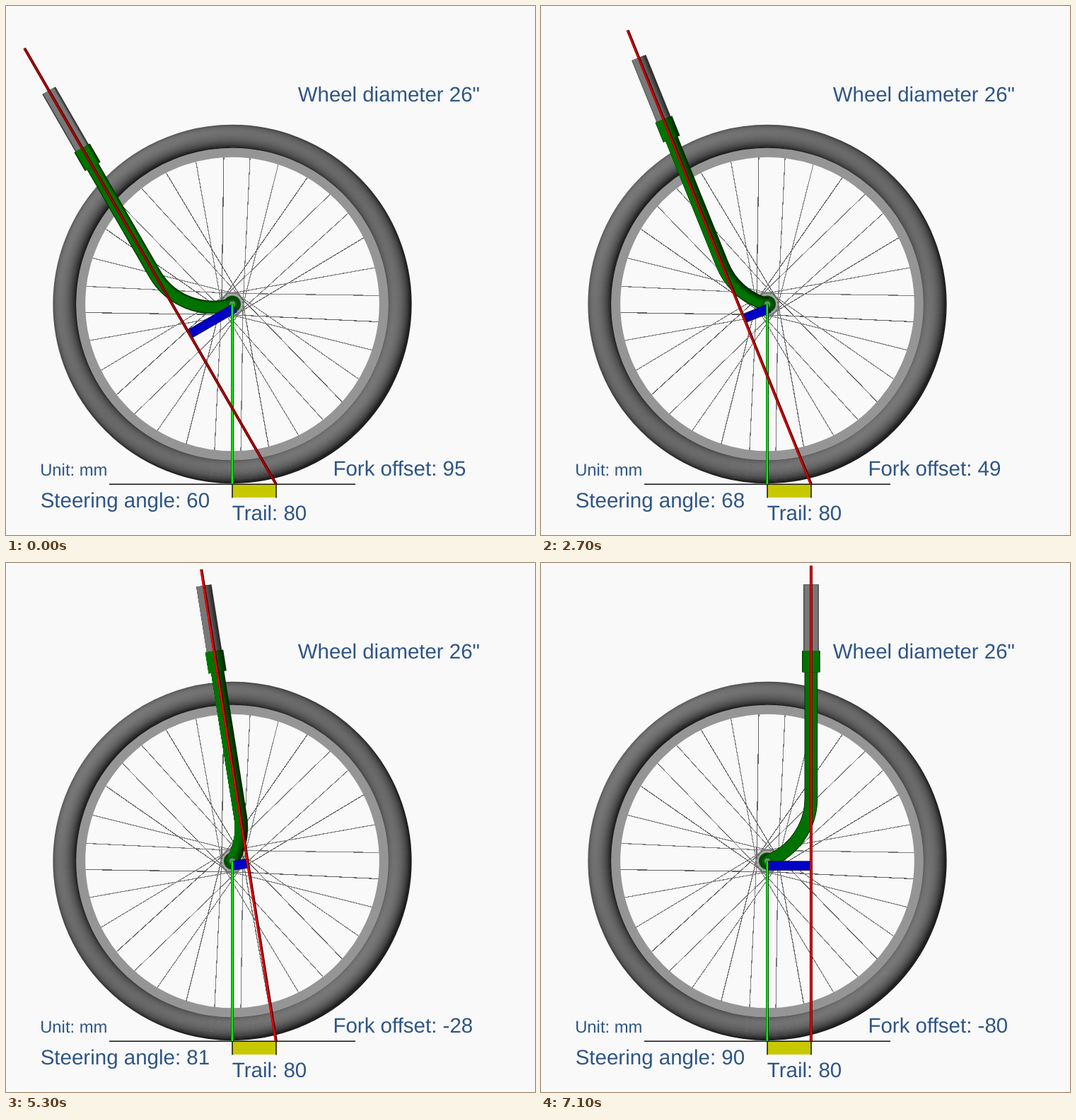
An HTML page that plays this animation: 748x748 px, repeating every 8 s.

```html
<!DOCTYPE html>
<html lang="en">
<head>
<meta charset="utf-8">
<title>Fork offset and trail</title>
<style>
html, body { margin: 0; width: 100%; height: 100%; overflow: hidden; background: #f9f9f9; }
svg { display: block; width: 100vw; height: 100vh; }
text { font: 29.5px "Liberation Sans", Arial, sans-serif; fill: #2e5586; text-rendering: geometricPrecision; }
.small { font-size: 23.8px; }
.crisp { shape-rendering: crispEdges; }
</style>
</head>
<body>
<svg id="stage" viewBox="0 0 748 748">
  <defs id="defs"></defs>
  <g id="wheel" fill="none"></g>
  <path d="M146 676.3H494" stroke="#111" stroke-width="1.5"/>
  <rect x="320" y="677" width="62" height="18" fill="#c8c800"/>
  <path d="M320 676V695.5M382 676V695.5" stroke="#111" stroke-width="1.5"/>
  <circle cx="320" cy="421.5" r="12" fill="#004c00"/>
  <g id="fork" fill="none">
    <g id="steerer"></g>
    <g id="blades"></g>
    <g id="collar"></g>
  </g>
  <circle cx="320" cy="421.5" r="7" fill="#006400"/>
  <circle cx="320" cy="421.5" r="4" fill="#6f8f6f"/>
  <g id="bar"><rect id="offsetBar" height="12.6" fill="#0000c4" stroke="#000050" stroke-width=".8"/></g>
  <path d="M320 421.5V676" stroke="#053c05" stroke-width="4"/>
  <path d="M319.8 421.5V676" stroke="#00f400" stroke-width="2.4"/>
  <g id="axis">
    <path id="axisDark" stroke="#480000" stroke-width="4"/>
    <path id="axisLight" stroke-width="2.6"/>
  </g>
  <text x="412.8" y="134.8" style="font-size:29.4px">Wheel diameter 26"</text>
  <text x="462.4" y="664.3">Fork offset: <tspan id="offset"></tspan></text>
  <text class="small" x="48.2" y="664">Unit: mm</text>
  <text x="48.7" y="708.6">Steering angle: <tspan id="angle"></tspan></text>
  <text x="319.8" y="727">Trail: 80</text>
</svg>
<script>
const $ = id => document.getElementById(id);
const CX = 320, CY = 421.5, SCALE = 0.775;
const RADIUS = 328, TRAIL = 80, BEND = 95, LAYERS = 6;

function add(parent, tag, attrs) {
  const el = document.createElementNS("http://www.w3.org/2000/svg", tag);
  set(el, attrs);
  parent.appendChild(el);
  return el;
}
function set(el, attrs) {
  for (const key in attrs) el.setAttribute(key, attrs[key]);
}
const mix = (a, b, t) => a + (b - a) * t;
const rgb = (a, b, t) => `rgb(${a.map((v, i) => Math.round(mix(v, b[i], t)))})`;

// Tyre: rings of a torus lit from the upper left
function drawTyre() {
  const inner = 220.5, outer = 253.3, count = 22, step = (outer - inner) / count;
  const lx = -0.74, ly = -0.67;
  for (let i = 0; i < count; i++) {
    const r = inner + (i + 0.5) * step;
    const u = (2 * (i + 0.5)) / count - 1, nz = Math.sqrt(1 - u * u);
    const grad = add($("defs"), "linearGradient", {
      id: "ring" + i, gradientUnits: "userSpaceOnUse",
      x1: CX + lx * r, y1: CY + ly * r, x2: CX - lx * r, y2: CY - ly * r
    });
    for (let k = 0; k <= 8; k++) {
      const v = Math.round(30 + 100 * Math.max(0, 0.74 * nz + 0.5 * u * (1 - k / 4)));
      add(grad, "stop", { offset: k / 8, "stop-color": `rgb(${v},${v},${v})` });
    }
    add($("wheel"), "circle", { cx: CX, cy: CY, r, stroke: `url(#ring${i})`, "stroke-width": step + 0.7 });
  }
}

function drawSpokes() {
  const point = (r, deg) => {
    const a = deg * Math.PI / 180;
    return `${(CX + r * Math.sin(a)).toFixed(2)} ${(CY - r * Math.cos(a)).toFixed(2)}`;
  };
  const pattern = [-3.3, 6.9, 18.2, 30.7];
  const side = [-90, 90, 90, -90];
  for (let i = 0; i < 32; i++) {
    const deg = pattern[i % 4] + 45 * Math.floor(i / 4);
    add($("wheel"), "path", {
      class: "crisp",
      d: `M${point(209, deg)}L${point(15.2, deg + side[i % 4])}`,
      stroke: i % 3 ? "#7c7c7c" : "#626262", "stroke-width": 1.2
    });
  }
}

function drawWheel() {
  add($("wheel"), "circle", { cx: CX, cy: CY, r: 17.5, fill: "#a6a6a6" });
  drawSpokes();
  drawTyre();
  add($("wheel"), "circle", { cx: CX, cy: CY, r: 214.3, stroke: "#959595", "stroke-width": 13 });
}

// A tube is a stack of narrowing strokes; shade narrows the lit part and moves it left
function makeTube(id, width, dark, light) {
  const paths = [];
  for (let i = 0; i < LAYERS; i++) {
    const t = i / (LAYERS - 1);
    paths.push({ t, el: add($(id), "path", { stroke: rgb(dark, light, t) }) });
  }
  return (d, shade) => paths.forEach(({ t, el }) => {
    const w = width * (1 - t * mix(0.15, 0.56, shade));
    set(el, { d, "stroke-width": w, transform: `translate(${-(width - w) / 2 * shade} 0)` });
  });
}

const steerer = makeTube("steerer", 21.5, [44, 44, 44], [120, 120, 120]);
const blades = makeTube("blades", 18.6, [0, 40, 0], [0, 114, 0]);
const collar = makeTube("collar", 25.5, [0, 44, 0], [0, 116, 0]);

function pose(deg) {
  const a = deg * Math.PI / 180, sin = Math.sin(a), cos = Math.cos(a);
  const offset = RADIUS * cos - TRAIL * sin;
  const d = offset * SCALE, size = Math.abs(d);
  const reach = (RADIUS * sin + TRAIL * cos) * SCALE;
  const px = 381.9 - reach * cos, py = 676 - reach * sin;
  const place = { transform: `translate(${px} ${py}) rotate(${deg - 90})` };
  const shade = deg === 90 ? 0 : Math.min(1, 0.3 + (deg - 60) / 15);

  for (const id of ["fork", "bar", "axis"]) set($(id), place);

  const h = Math.sqrt(2 * BEND * size - size * size);
  steerer("M0 -391.3V-290", shade);
  blades(`M0 -280V${-h}A${BEND} ${BEND} 0 0 ${d > 0 ? 0 : 1} ${d} 0`, shade);
  collar("M0 -297.5V-267.5", shade);

  set($("offsetBar"), { x: Math.min(0, d), y: 0, width: size });

  const top = reach - 418 - RADIUS * SCALE / sin;
  const line = `M0 ${reach}V${top}`;
  set($("axisDark"), { d: line });
  set($("axisLight"), {
    d: line,
    stroke: rgb([168, 0, 0], [232, 0, 0], Math.min(1, (deg - 60) / 15)),
    transform: `translate(${-0.7 * shade} 0)`
  });

  $("offset").textContent = Math.round(offset);
  $("angle").textContent = deg;
}

let shown = 0;
function frame() {
  const t = performance.now() % 8000;
  const deg = Math.max(60, Math.min(90, 61 + Math.floor((t - 1300) / 200)));
  if (deg !== shown) pose(shown = deg);
  requestAnimationFrame(frame);
}

drawWheel();
frame();
</script>
</body>
</html>
```
